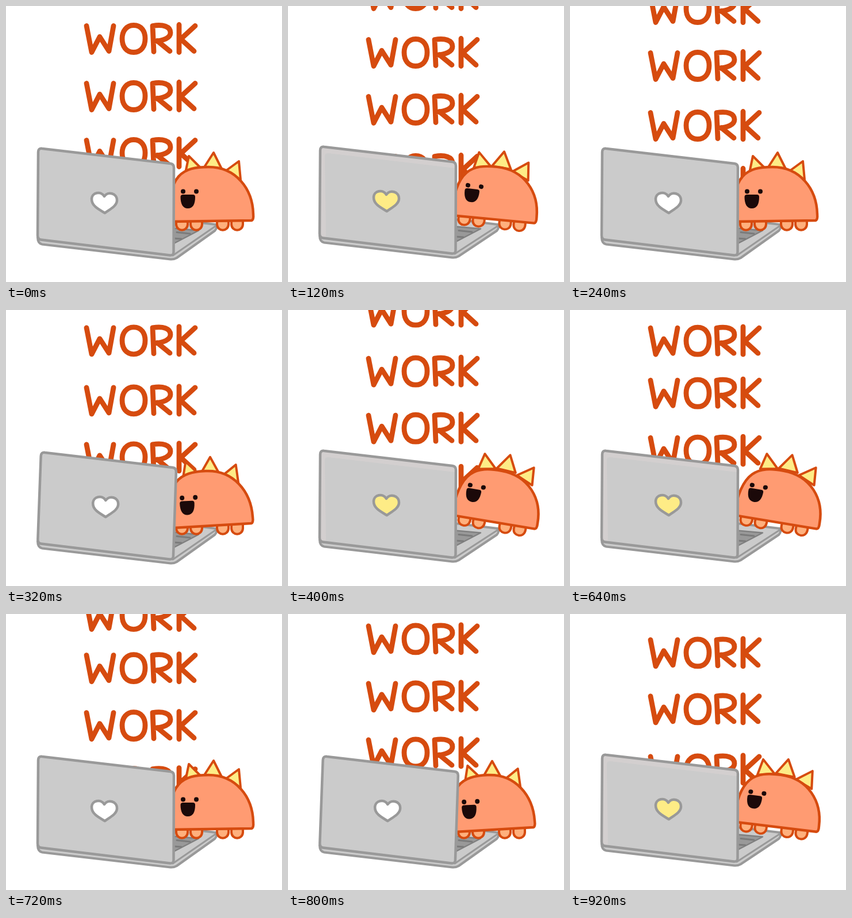
An HTML page with a canvas that plays this animation: 480 px wide and 480 px high, repeating every 960 ms.

```html
<!DOCTYPE html>
<html lang="en">
<head>
<meta charset="utf-8">
<title>Work work work</title>
<style>
  html, body { margin: 0; height: 100%; overflow: hidden; background: #fff; }
  canvas { display: block; }
</style>
</head>
<body>
<canvas id="stage" width="480" height="480" role="img" aria-label="WORK WORK WORK"></canvas>
<script>
const ctx = document.getElementById('stage').getContext('2d');
ctx.lineCap = ctx.lineJoin = 'round';

const LOOP = 960, STEP = 40;
const ORANGE = '#d64b0f', SKIN = '#ff9b72', FOOT = '#ffb07d', YELLOW = '#feec86';
const GREY = '#cbcbcb', EDGE = '#999', DARK = '#1b0909';

// One typing beat: body sway, laptop lift, lid lean
const BEAT = [
  { sway: 0, lift: 0, lean: 0 },
  { sway: 0, lift: 0, lean: 0 },
  { sway: -.25, lift: 0, lean: .03 },
  { sway: .6, lift: 3, lean: 0 },
  { sway: 1, lift: 3, lean: 0 },
  { sway: .75, lift: 3, lean: 0 },
];

// Text column: resting tops of the words and their speed per step
const WORD_TOPS = [30, 130, 229, 333, 432, 523, 623, 721, 826];
const WORD_SPEED = 25.33;

const word = new Path2D(
  'M140 36L149 82L163 55L179 80L187 36' +
  'M222 35C236 35 242 46 242 58C242 72 235 82 222 82C209 82 202 72 202 58C202 46 209 35 222 35' +
  'M257 81L255 36C273 33 286 37 286 48C286 57 274 62 257 63M263 62L285 80' +
  'M301 34L301 82M329 36L304 59L327 80');

const lid = new Path2D('M63 248L286 274Q292 275 292 281L291.5 428Q291.5 434 285 433.5L61 406.5Q55 406 55 399L56 254Q56 247 63 248Z');
const lidFace = new Path2D('M70 259L290 285V432L66 405L64 265Q64 258 70 259Z');
const heart = new Path2D('M172 360C162 354 149 348 149 336C149 324 165 321 171 331C177 322 193 325 193 338C193 348 180 354 172 360Z');

const body = new Path2D('M283 375L427 373Q431 372 430 362C429 318 400 280 352 280C308 280 281 292 283 375Z');
const spikes = new Path2D('M312 290L318 261L341 284ZM343 283L361 255L376 285ZM379 289L405 270L408 302Z');
const feet = new Path2D([306, 331, 377, 402].map(x =>
  `M${x - 10} 372V380C${x - 9} 393 ${x + 9} 393 ${x + 10} 380V372Z`).join(''));
const mouth = new Path2D('M303.5 332Q303.5 328 308 328H325Q329 328 329 332C329 345 325 352 316 352C308 352 303.5 345 303.5 332Z');

function paint(path, fill, stroke, width = 4) {
  if (fill) { ctx.fillStyle = fill; ctx.fill(path); }
  if (stroke) { ctx.strokeStyle = stroke; ctx.lineWidth = width; ctx.stroke(path); }
}

function group(draw) {
  ctx.save();
  draw();
  ctx.restore();
}

function drawWords(step) {
  for (const top of WORD_TOPS) {
    const y = top - WORD_SPEED * step;
    if (y < -60 || y > 330) continue;
    group(() => {
      ctx.translate(0, y - 31.5);
      paint(word, null, ORANGE, 8.8);
    });
  }
}

function drawBase(lift) {
  const y = v => v - lift;
  const path = d => new Path2D(d);
  paint(path(`M55 ${y(402)}Q55 ${y(413)} 63 ${y(414.5)}L286 ${y(440.5)}Q292 ${y(441)} 297 ${y(438)}L363 391Q368 386 365 380L290 371V${y(420)}Z`), GREY, EDGE);
  paint(path(`M290 ${y(434)}L364 383`), null, EDGE, 3);
  paint(path(`M285 ${y(386)}L335 ${y(390.5)}L290 ${y(414)}Z`), EDGE, '#808080', 2.5);
  paint(path(`M297 ${y(393.5)}L320 ${y(396)}M290 ${y(404)}L305 ${y(405)}`), null, '#7b7b7b', 3);
}

// Tilts, shears and squashes the creature around its feet
function sway(k) {
  ctx.transform(1, .18 * k, -.19 * k, 1 - .06 * k, 72.8 * k, -46.8 * k);
}

function drawCreature(k) {
  group(() => {
    sway(Math.max(0, k));
    paint(feet, FOOT, ORANGE);
  });
  group(() => {
    sway(k);
    group(() => {
      ctx.translate(0, -6 * k);
      paint(spikes, YELLOW, ORANGE);
    });
    paint(body, SKIN, ORANGE, 4.5);
    ctx.translate(-4 * k, -7 * k);
    paint(mouth, DARK);
    for (const x of [308, 331]) {
      const eye = new Path2D();
      eye.arc(x, 322.5, 4, 0, 7);
      paint(eye, DARK);
    }
  });
}

function drawLid({ lift, lean }) {
  group(() => {
    ctx.transform(1, 0, -lean, 1, 410 * lean, -lift);
    paint(lid, lift ? '#d3cfcf' : GREY);
    if (lift) paint(lidFace, GREY);
    paint(lid, null, EDGE, 4.5);
    paint(heart, lift ? YELLOW : '#fff', EDGE, 4.5);
  });
}

function frame() {
  const step = Math.floor(performance.now() % LOOP / STEP);
  const pose = BEAT[step % BEAT.length];
  ctx.fillStyle = '#fff';
  ctx.fillRect(0, 0, 480, 480);
  drawWords(step);
  drawBase(pose.lift);
  drawCreature(pose.sway);
  drawLid(pose);
  requestAnimationFrame(frame);
}
frame();
</script>
</body>
</html>
```
